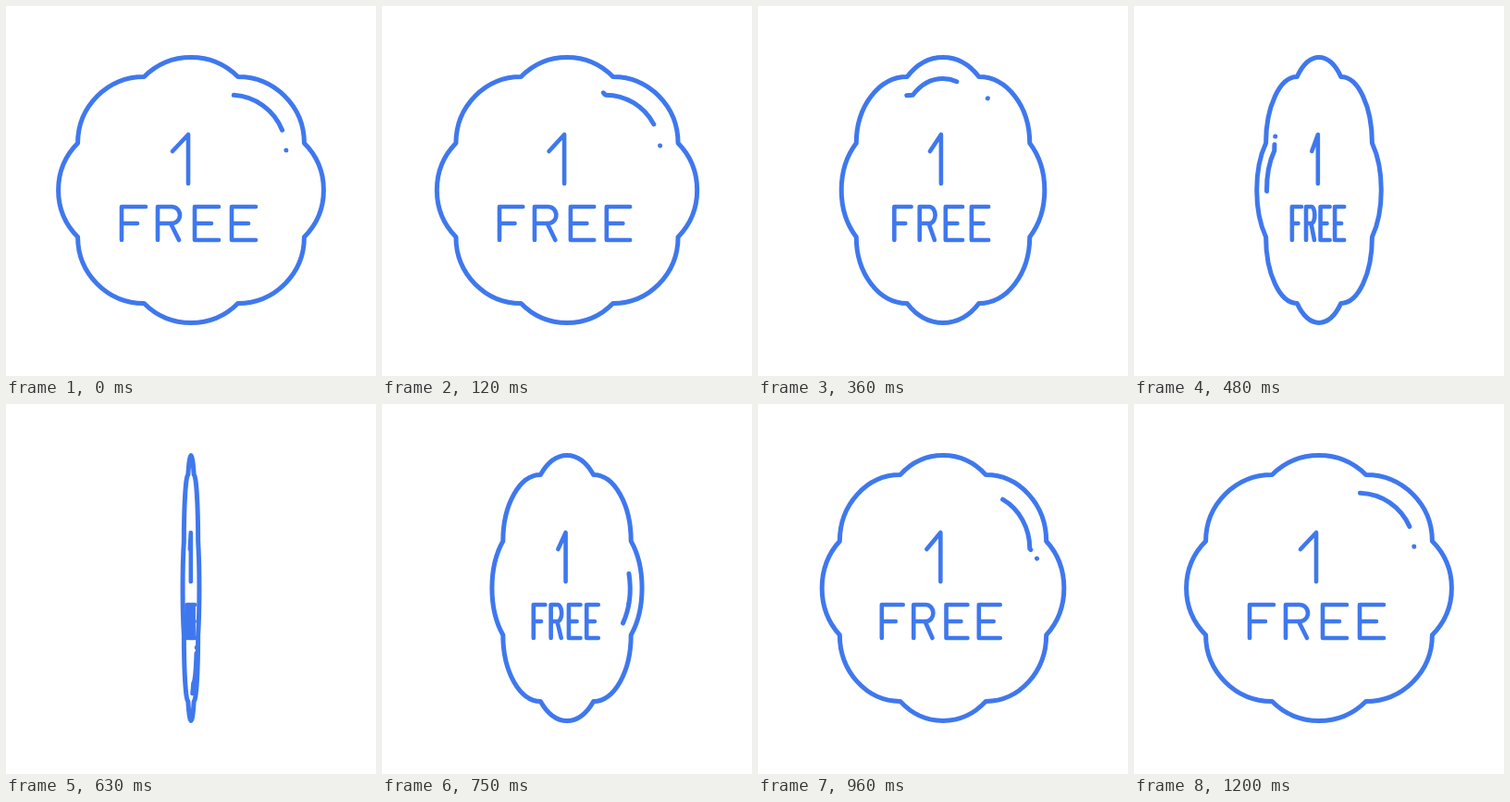
An HTML page for the animation above (4230 ms loop, 400x400 px).

```html
<!DOCTYPE html>
<html lang="en">
<head>
<meta charset="utf-8">
<title>1 free badge</title>
<style>
html, body { margin: 0; width: 100%; height: 100%; overflow: hidden; background: #fff; }
svg { display: block; }
path {
  fill: none; stroke: #3f78ee; stroke-width: 5;
  stroke-linecap: round; stroke-linejoin: round;
}
#label path { stroke-width: 4.6; vector-effect: non-scaling-stroke; }
</style>
</head>
<body>
<svg width="400" height="400" role="img" aria-label="1 FREE">
  <g transform="translate(200 199)">
    <path id="rim"/>
    <path id="shine" pathLength="8" stroke-dasharray="0.72 7.28"/>
    <path id="dot" pathLength="8" stroke-dasharray="0.001 7.999"/>
    <g id="label">
      <path d="M-20-42L-3-60V-7"/>
      <path d="M-75 54V18H-49M-75 36H-58"/>
      <path d="M-36 54V18H-21A9 9 0 0 1-21 36H-36M-22 36L-13 54"/>
      <path d="M30 18H4V54H30M4 36H22"/>
      <path d="M70 18H44V54H70M44 36H62"/>
    </g>
  </g>
</svg>
<script>
const LOOP = 4230, SPIN = 1200, STEP = 30;
const el = id => document.getElementById(id);
const [rim, shine, dot, label] = ['rim', 'shine', 'dot', 'label'].map(el);

// cubic-bezier(x1, 0, x2, 1)
function ease(x, x1, x2) {
  let lo = 0, hi = 1, s;
  for (let i = 0; i < 30; i++) {
    s = (lo + hi) / 2;
    const r = 1 - s;
    if (3 * s * r * r * x1 + 3 * s * s * r * x2 + s * s * s < x) lo = s;
    else hi = s;
  }
  return s * s * (3 - 2 * s);
}

// Eight quarter-circle lobes, clockwise from the top, squeezed by sx
function flower(R, sx) {
  const a = Math.PI / 8, r = R * Math.sin(a) * Math.SQRT2;
  const top = -R * Math.cos(a) - r * (1 - Math.SQRT1_2);
  const arc = (x, y) => `A${r * sx} ${r} 0 0 1 ${x * sx} ${y}`;
  let d = `M0 ${top}`;
  for (let k = 1; k < 16; k += 2) d += arc(R * Math.sin(k * a), -R * Math.cos(k * a));
  return d + arc(0, top) + 'Z';
}

function draw(ms) {
  const t = Math.min(Math.floor(ms % LOOP / STEP) * STEP, SPIN) / SPIN;
  const u = Math.abs(2 * t - 1);
  const sx = Math.max(ease(u, .12, .12), .002);
  const inner = flower(111.3, sx);
  rim.setAttribute('d', flower(132.5, sx));
  shine.setAttribute('d', inner);
  dot.setAttribute('d', inner);
  shine.setAttribute('stroke-dashoffset', 8.02 * ease(t, .62, .28) - .54);
  dot.setAttribute('stroke-dashoffset', 8.02 * ease(t, .74, .07) - 1.495);
  label.setAttribute('transform', `scale(${Math.max(ease(u, .1, .26), .002)} 1)`);
}

const start = performance.now();
function tick() {
  draw(performance.now() - start);
  requestAnimationFrame(tick);
}
tick();
</script>
</body>
</html>
```
